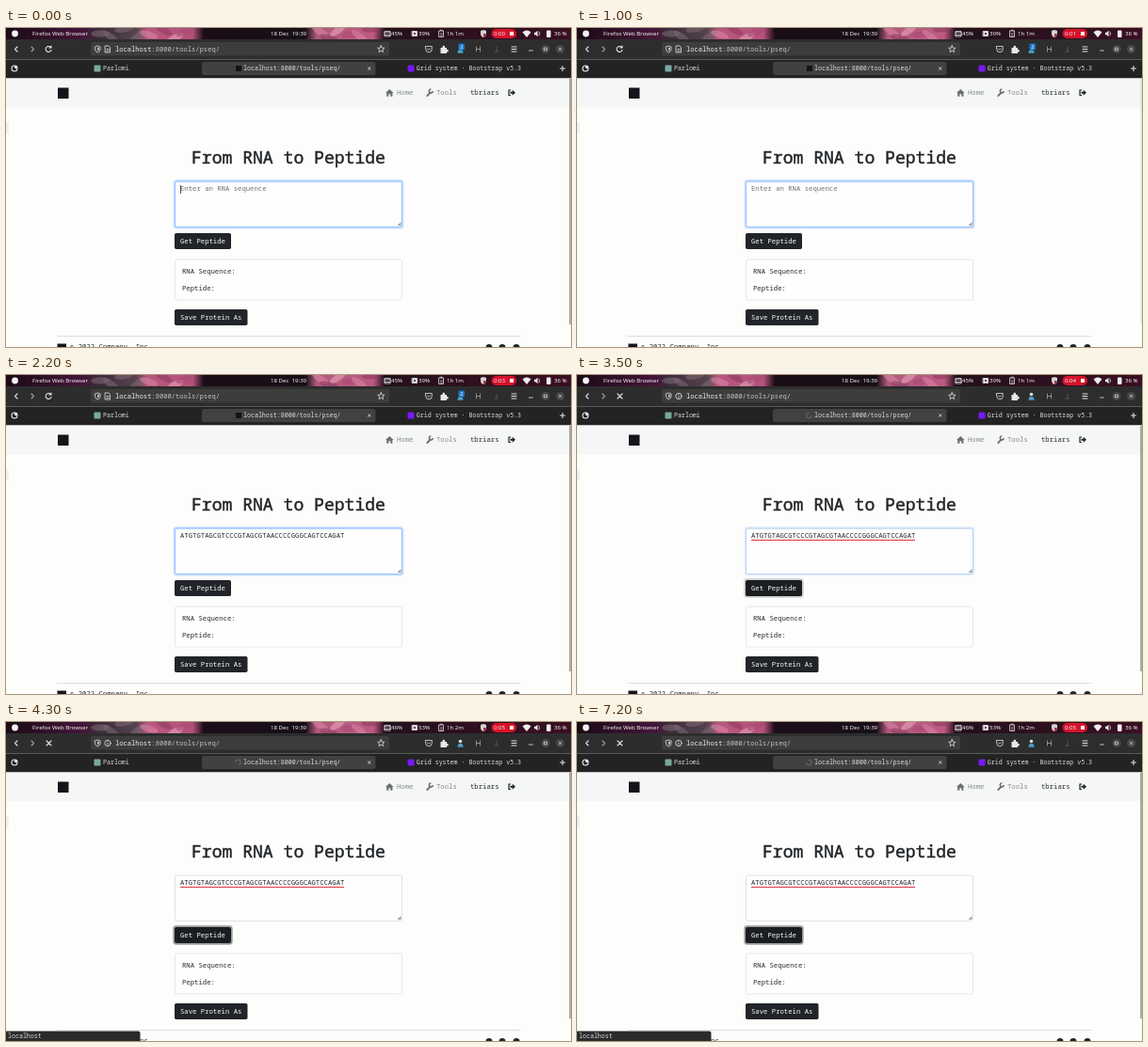
An HTML page that plays this animation: 600x339 px, repeating every 8 s.

```html
<!DOCTYPE html>
<html lang="en">
<head>
<meta charset="utf-8">
<title>From RNA to Peptide</title>
<style>
  html, body { margin: 0; width: 100%; height: 100%; overflow: hidden; background: #fdfdfc; }
  svg { display: block; width: 100%; height: 100%; }
  text { font: 7.28px "Noto Sans Mono", "DejaVu Sans Mono", monospace; fill: #26292d; white-space: pre; }
  .tab text, .status text { font-size: 6.64px; fill: #dcdcdc; }
  .panel text { font: 6.1px "Noto Sans", "Open Sans", sans-serif; fill: #f4f0f2; }
  .line { fill: none; stroke: #e4e4e4; stroke-width: 1.1; stroke-linecap: round; stroke-linejoin: round; }
  .fine { stroke-width: .8; }
  .dim { stroke: #a2a2a2; }
  .muted text { fill: #85888a; }
  .button text { fill: #f8f9fa; }
  text.title { font-size: 18.07px; fill: #212529; stroke: #212529; stroke-width: .45; }
  text.url { font-size: 7.12px; fill: #c2c2c2; }
  text.badge { font-size: 6px; fill: #fff; }
</style>
</head>
<body>
<svg viewBox="0 0 600 339" preserveAspectRatio="none">
  <defs>
    <linearGradient id="wall">
      <stop offset="0" stop-color="#1b0a16"/>
      <stop offset=".14" stop-color="#45163a"/>
      <stop offset=".16" stop-color="#3a2b38"/>
      <stop offset=".23" stop-color="#55424f"/>
      <stop offset=".25" stop-color="#b9577f"/>
      <stop offset=".33" stop-color="#b5527b"/>
      <stop offset=".35" stop-color="#1b0d18"/>
      <stop offset=".53" stop-color="#170f18"/>
      <stop offset=".55" stop-color="#b25a7e"/>
      <stop offset=".65" stop-color="#bd5a83"/>
      <stop offset=".67" stop-color="#23101c"/>
      <stop offset="1" stop-color="#3a0f22"/>
    </linearGradient>
    <clipPath id="panelClip"><rect width="600" height="12"/></clipPath>
  </defs>
  <rect width="600" height="339" fill="#fdfdfc"/>

  <!-- desktop panel -->
  <g class="panel" clip-path="url(#panelClip)">
    <rect width="600" height="12" fill="url(#wall)"/>
    <g id="petals"></g>
    <circle cx="9.5" cy="6" r="3.4" fill="#f4f4f4"/>
    <text x="28" y="8.2">Firefox Web Browser</text>
    <text x="281" y="8.2">18 Dec  19:39</text>
    <g class="line fine">
      <rect x="402.500" y="3.500" width="5.500" height="5.500"/>
      <path d="M401.500 5h7M401.500 7.500h7"/>
      <rect x="431.500" y="3.500" width="5" height="5" fill="#e8e8e8"/>
      <rect x="460" y="3" width="4.500" height="6.500"/>
      <path d="M461.300 2.300h2M461.500 6h1.500M461.500 8h1.500"/>
    </g>
    <circle cx="434" cy="6" r="1" fill="#2c1422"/>
    <text id="cpu" x="409" y="8.2"></text>
    <text id="mem" x="438" y="8.2"></text>
    <text id="uptime" x="468" y="8.2"></text>
    <path d="M504 3l3-1 3 1v3q0 3-3 4q-3-1-3-4z" fill="#cfd6cf"/>
    <path d="M507 6h3q0 3-3 4z" fill="#b8324a"/>
    <rect x="515.500" y="1" width="26.500" height="10" rx="5" fill="#d5132b"/>
    <text id="timer" x="518" y="8.2"></text>
    <rect x="535" y="4" width="4" height="4" rx=".5" fill="#fff"/>
    <path d="M548.500 4.500q4.500-4 9 0L553 10z" fill="#f0f0f0"/>
    <path d="M561 4.700h1.500l2-2v6.600l-2-2H561z" fill="#f0f0f0"/>
    <path class="line fine" d="M566 4q1.500 2 0 4"/>
    <rect x="574" y="2.500" width="4.500" height="7.500" rx="1" fill="#f0f0f0"/>
    <text x="582" y="8.2">36 %</text>
  </g>

  <!-- browser toolbar -->
  <rect y="12" width="600" height="21.500" fill="#2d2d2d"/>
  <rect x="90" y="15" width="317" height="14.500" rx="2.500" fill="#3d3d3d"/>
  <path class="line" d="M12 20l-2.500 2.500 2.500 2.500"/>
  <path class="line dim" d="M27 20l2.500 2.500-2.500 2.500"/>
  <path id="reload" class="line" d="M47.500 20.500a3 3 0 1 0 .5 3M48 19v2h-2"/>
  <path id="stop" class="line" d="M43 20l5 5m0-5l-5 5"/>
  <path class="line fine" d="M94.500 20l2.800-1 2.800 1v2.500q0 2.500-2.800 3.500q-2.800-1-2.800-3.500z"/>
  <path d="M97.300 20.500v4q1.500-1 1.500-2.500v-1z" fill="#e8e8e8"/>
  <path id="pageIcon" class="line fine" d="M105.500 19h3.500l1.500 1.500v5.500h-5zM107 22.500h2M107 24.300h2"/>
  <g id="infoIcon" class="line fine"><circle cx="108" cy="22.500" r="3.200"/><path d="M108 22.300v2M108 20.700v.1"/></g>
  <text class="url" x="116" y="24.600"><tspan fill="#f1f1f1">localhost</tspan>:8000/tools/pseq/</text>
  <path id="star" class="line fine"/>
  <path class="line fine" d="M445.700 19.500h6.600v3a3.300 3.300 0 0 1-6.600 0zM447.500 21.800l1.500 1.500 1.500-1.500"/>
  <path d="M461.500 21h2v-1a1.300 1.300 0 0 1 2.600 0v1h2v2h.6a1.200 1.200 0 0 1 0 2.400H468V27h-6.500z" fill="#e8e8e8"/>
  <circle cx="482.500" cy="20.500" r="1.800" fill="#cfe2ee"/>
  <path d="M479.500 26.800q0-4 3-4t3 4z" fill="#4d9ccb"/>
  <g id="badge">
    <rect x="480.500" y="16.500" width="6.500" height="7" rx="1" fill="#1976c5"/>
    <text class="badge" x="482" y="22.200">2</text>
  </g>
  <path class="line fine dim" d="M499.500 20v5M503.500 20v5M499.500 22.500h4"/>
  <path d="M518.500 25h4M521 20v5" fill="none" stroke="#48614f"/>
  <path class="line" d="M537 20h5M537 22.500h5M537 25h5"/>
  <g fill="#484848"><circle cx="573" cy="22.500" r="4.500"/><circle cx="588.500" cy="22.500" r="4.500"/></g>
  <path class="line fine" d="M555.500 24h4M571.700 21.200h2.600v2.600h-2.600zM587.200 21.200l2.600 2.600m0-2.600l-2.600 2.600"/>

  <!-- tabs -->
  <g class="tab">
    <rect y="33.500" width="600" height="20" fill="#232323"/>
    <rect x="208" y="36" width="184.500" height="14" rx="2.500" fill="#414141"/>
    <circle class="line" cx="9" cy="43" r="3"/>
    <circle cx="10.500" cy="41.500" r="1.700" fill="#e4e4e4"/>
    <rect x="93.500" y="39.500" width="7" height="7" rx="1" fill="#78aaa0"/>
    <text x="103" y="45">Parlomi</text>
    <rect id="favicon" x="244" y="40" width="6" height="6" fill="#151317"/>
    <path id="spinner" d="M246.300 40.200a2.800 2.800 0 1 0 2.800 2.800" fill="none" stroke="#777" stroke-width=".8"/>
    <text x="252" y="45">localhost:8000/tools/pseq/</text>
    <path class="line fine" d="M384.500 41.700l2.600 2.600m0-2.600l-2.600 2.600"/>
    <path class="line" d="M588.500 43h5M591 40.500v5"/>
    <rect x="426.500" y="39.500" width="7" height="7" rx="1.500" fill="#7a18f5"/>
    <text x="435.800" y="45">Grid system · Bootstrap v5.3</text>
  </g>

  <!-- page header -->
  <rect y="53.500" width="600" height="31" fill="#f5f7f6"/>
  <rect x="55" y="63.500" width="11.500" height="11.500" fill="#17131a"/>
  <g class="muted">
    <path d="M403 69l4.300-4 4.300 4h-1.200v3.700h-2.100v-2.500h-2v2.500h-2.100V69z" fill="#6d6f71"/>
    <text x="415" y="71.200">Home</text>
    <path d="M447.300 72l3.500-3.500" stroke="#6d6f71" stroke-width="1.800" stroke-linecap="round"/>
    <path d="M453.300 67a2 2 0 1 1-2-2" fill="none" stroke="#6d6f71" stroke-width="1.400"/>
    <text x="457" y="71.200">Tools</text>
  </g>
  <text x="493" y="71.200">tbriars</text>
  <path d="M536 66h-2v5.500h2" fill="none" stroke="#212529" stroke-width="1.200"/>
  <path d="M535.500 67.800h2.300v-2l3.200 3-3.200 3v-2h-2.300z" fill="#212529"/>
  <rect x="-2" y="100" width="5" height="12" rx="1.500" fill="#f0f0f0"/>

  <!-- form -->
  <text class="title" x="197" y="143.500">From RNA to Peptide</text>
  <rect x="179.500" y="163" width="241" height="48.500" rx="2" fill="#fefefe" stroke="#dfe2e4"/>
  <g id="focusRing" fill="none">
    <rect x="178.700" y="162.200" width="242.600" height="50.100" rx="2.500" stroke="#cfe2ff" stroke-width="2.400"/>
    <rect x="179.500" y="163" width="241" height="48.500" rx="2" stroke="#93bffe"/>
  </g>
  <path d="M415.500 210h4v-4z" fill="#a0a0a0"/>
  <text id="hint" x="185" y="173.100" fill-opacity=".65">Enter an RNA sequence</text>
  <text id="sequence" x="185" y="173.100">ATGTGTAGCGTCCCGTAGCGTAACCCCGGGCAGTCCAGAT</text>
  <path id="spelling" d="M185 175.500h174" stroke="#e0353d"/>
  <rect id="caret" y="167" width=".8" height="9" fill="#222"/>
  <g class="button">
    <rect id="buttonRing" x="178.200" y="217.200" width="61.600" height="18.600" rx="2.500" fill="none" stroke="#9a9da0" stroke-width="1.800"/>
    <rect id="button" x="179" y="218" width="60" height="17" rx="1.800"/>
    <text x="185" y="229">Get Peptide</text>
    <rect x="179" y="299" width="77.500" height="17" rx="1.800" fill="#212529"/>
    <text x="185" y="310.300">Save Protein As</text>
  </g>
  <rect x="179.500" y="246" width="241" height="43" rx="2" fill="#fefefe" stroke="#e6e7e7"/>
  <text x="187" y="261">RNA Sequence:</text>
  <text x="187" y="278.500">Peptide:</text>

  <!-- footer -->
  <path d="M54 327.500h492" stroke="#dcdddd"/>
  <rect x="54.500" y="335.500" width="9.500" height="9" fill="#17131a"/>
  <text x="68" y="341.400">© 2022 Company, Inc</text>
  <g fill="#212529"><circle cx="513" cy="339.500" r="3.500"/><circle cx="527" cy="339.500" r="3.500"/><circle cx="542" cy="339.500" r="3.500"/></g>
  <rect id="scrollbar" x="598.500" y="54" width="1" height="261" fill="#5c5e5e"/>
  <g id="status" class="status">
    <path d="M0 328.500h140.500q2 0 2 2V339H0z" fill="#2b2b2b"/>
    <text x="2" y="336">localhost</text>
  </g>
</svg>
<script>
  const LOOP = 8000;
  const $ = id => document.getElementById(id);
  const set = (id, name, value) => $(id).setAttribute(name, value);
  const show = (id, alpha) => { $(id).style.opacity = Number(alpha); };
  const label = (id, value) => { if ($(id).textContent !== value) $(id).textContent = value; };

  // last value whose start time has passed
  const at = (steps, t) => steps.filter(([start]) => start <= t).pop()[1];
  const ramp = (t, from, to) => Math.min(1, Math.max(0, (t - from) / (to - from)));

  const seconds = [[0, 0], [200, 1], [1200, 2], [2200, 3], [3200, 4], [4300, 5]];
  const turns = [[0, 0], [3600, 60], [3700, 0], [3800, 60], [3900, 120], [4100, 180],
                 [4500, 200], [4700, 220], [5300, 260], [7200, 265]];

  // two flowers, one muted on its left side
  function drawPetals() {
    const tones = ['#d983a4', '#8e3a60', '#e6a5b8', '#a84a73'];
    let petals = '';
    for (let i = 0; i < 14; i++) {
      const x = i < 8 ? 100 + i * 13 : 333 + (i - 8) * 11;
      const tone = i < 4 ? '#7a6672' : tones[i % 4];
      petals += `<ellipse cx="${x}" cy="${6 + 5 * Math.sin(i * 2.3)}" rx="10" ry="3.5"
        transform="rotate(${35 * Math.sin(i * 1.7)} ${x} 6)" fill="${tone}" opacity=".6"/>`;
    }
    $('petals').innerHTML = petals;
  }

  function starPath(cx, cy, r) {
    const points = Array.from({ length: 10 }, (_, i) => {
      const a = i * Math.PI / 5 - Math.PI / 2, d = i % 2 ? r * .45 : r;
      return `${cx + d * Math.cos(a)} ${cy + d * Math.sin(a)}`;
    });
    return `M${points.join('L')}z`;
  }

  function draw(t) {
    const pasted = t >= 1600, loading = t >= 3500, updated = t >= 4100;
    label('timer', `0:0${at(seconds, t)}`);
    label('cpu', updated ? '46%' : '45%');
    label('mem', updated ? '53%' : '39%');
    label('uptime', updated ? '1h 2m' : '1h 1m');

    show('hint', !pasted);
    show('sequence', pasted);
    show('caret', t < 200 || (t >= 2900 && !loading));
    set('caret', 'x', pasted ? 359 : 185);

    const blur = ramp(t, 3400, 3600);
    show('focusRing', 1 - blur);
    show('buttonRing', blur);
    show('spelling', loading);
    set('button', 'fill', t >= 3100 ? '#1a1e21' : '#212529');

    for (const id of ['reload', 'favicon', 'pageIcon', 'badge']) show(id, !loading);
    for (const id of ['stop', 'spinner', 'infoIcon']) show(id, loading);
    set('spinner', 'transform', `rotate(${at(turns, t)} 246.3 43)`);
    show('status', t >= 4300);
    show('scrollbar', t < 1600 ? 1 - ramp(t, 500, 1150) : t < 1900 ? .6 : 1);
  }

  drawPetals();
  set('star', 'd', starPath(398.3, 22.5, 3.8));
  const start = performance.now();
  (function tick() {
    draw((performance.now() - start) % LOOP);
    requestAnimationFrame(tick);
  })();
</script>
</body>
</html>
```
